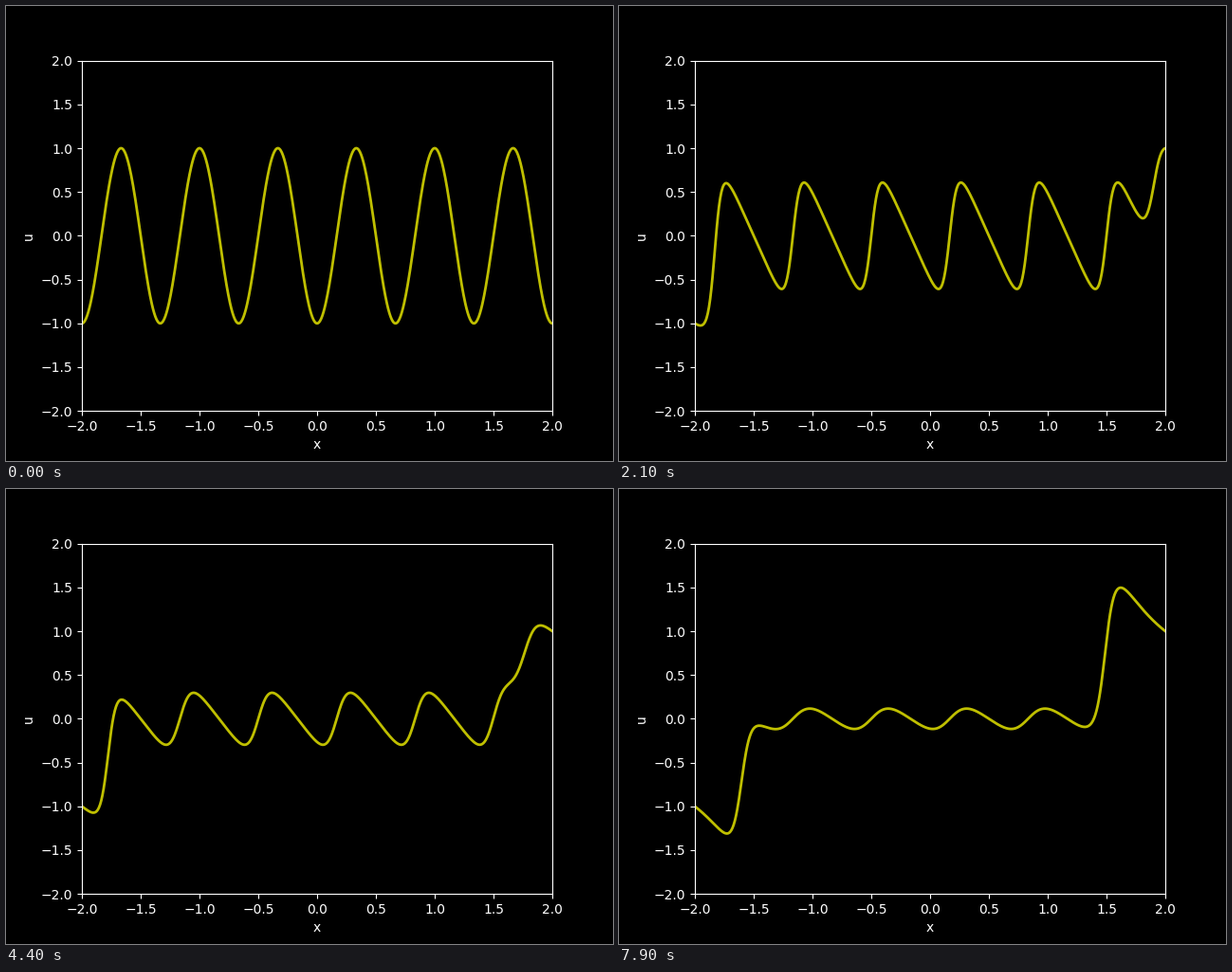
Animation, 640 px wide and 480 px high, one loop 8000 ms. Source, as a matplotlib script:

```python
import numpy as np
import matplotlib.pyplot as plt
from matplotlib.animation import FuncAnimation

FRAMES, INTERVAL = 80, 100
DT = 0.01          # model time per frame
SUBSTEPS = 25
NU = 0.0273        # viscosity

x = np.linspace(-2, 2, 801)
dx = x[1] - x[0]


def rate(u):
    """u_t = u u_x + nu u_xx + u^3, ends held fixed."""
    du = np.zeros_like(u)
    mid, left, right = u[1:-1], u[:-2], u[2:]
    du[1:-1] = (mid * (right - left) / (2 * dx)
                + NU * (right - 2 * mid + left) / dx**2
                + mid**3)
    return du


def rk4(u, h):
    k1 = rate(u)
    k2 = rate(u + h / 2 * k1)
    k3 = rate(u + h / 2 * k2)
    k4 = rate(u + h * k3)
    return u + h / 6 * (k1 + 2 * k2 + 2 * k3 + k4)


def solve():
    u = -np.cos(3 * np.pi * x)
    states = [u.copy()]
    u[0], u[-1] = -1, 1
    for _ in range(FRAMES - 1):
        for _ in range(SUBSTEPS):
            u = rk4(u, DT / SUBSTEPS)
        states.append(u.copy())
    return states


states = solve()

plt.style.use("dark_background")
fig, ax = plt.subplots(figsize=(6.4, 4.8), dpi=100)
ax.set(xlim=(-2, 2), ylim=(-2, 2), xlabel="x", ylabel="u")
line, = ax.plot(x, states[0], color="y", lw=2)


def update(i):
    line.set_ydata(states[i])
    return line,


anim = FuncAnimation(fig, update, frames=FRAMES, interval=INTERVAL,
                     repeat=True, repeat_delay=0)
plt.show()
```
